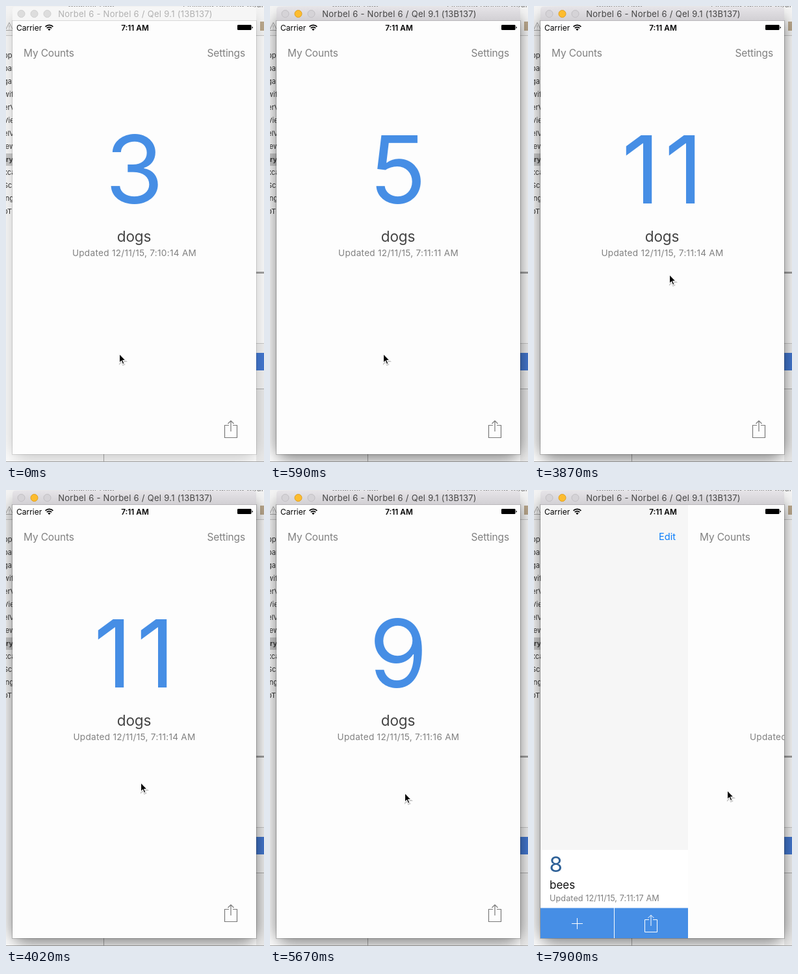
An HTML page for the animation above (8000 ms loop, 397 by 702 pixels).

```html
<!DOCTYPE html>
<html lang="en">
<head>
<meta charset="utf-8">
<title>Counter</title>
<style>
html, body { margin: 0; width: 100%; height: 100%; overflow: hidden; background: #f4f4f4; }
svg { display: block; width: 397px; height: 702px; font-family: Inter, Roboto, "Liberation Sans", sans-serif; }
text { white-space: pre; }
.nav { font-size: 15.5px; letter-spacing: -.15px; fill: #808080; }
.mid { text-anchor: middle; }
.end { text-anchor: end; }
.count { font-size: 145px; letter-spacing: 7px; fill: #468ee5; }
.unit { font-size: 22.6px; letter-spacing: -.15px; fill: #444; }
.stamp { font-size: 13.6px; letter-spacing: .28px; fill: #808080; }
.side { font-size: 11px; fill: #333; }
</style>
</head>
<body>
<svg viewBox="0 0 397 702">
  <defs>
    <linearGradient id="bar" x2="0" y2="1">
      <stop stop-color="#e6e4e8"/><stop offset="1" stop-color="#d1cfd3"/>
    </linearGradient>
    <filter id="soft" x="-20%" y="-10%" width="140%" height="120%"><feGaussianBlur stdDeviation="11"/></filter>
    <clipPath id="screen"><rect x="10" y="22" width="375" height="668"/></clipPath>
    <g id="share" fill="none">
      <path d="M343 645.5H336.5V664.5H355.5V645.5H349M346 655V638.5M341.5 643L346 638.5L350.5 643"/>
    </g>
    <path id="arrow" d="M0.5 0.5V14.3L3.5 11.4L5.6 16.4L7.9 15.4L5.8 10.5H10.2Z"/>
  </defs>

  <!-- desktop behind the window -->
  <rect width="397" height="702" fill="#fafafa"/>
  <rect width="397" height="45" fill="#f3f3f3"/>
  <rect x="385" y="520" width="12" height="69" fill="#f0f0f0"/>
  <path d="M0 45.5H397M385 519.5H397" stroke="#c9c9c9"/>
  <path d="M-1 37.5L5 25.5L11 37.5ZM5 29.5V33.5M5 35V36" fill="none" stroke="#a5a5a5"/>
  <rect x="391" y="24" width="6" height="14" fill="#b9a78c"/>
  <rect y="227" width="10" height="19" fill="#cbcbcb"/>
  <g id="files"></g>
  <rect x="385" y="589" width="12" height="113" fill="#e8e8e8"/>
  <path d="M385 589.5H397M150.5 690V702M0 701.5H397" stroke="#aaa"/>
  <rect x="385" y="409" width="12" height="3" fill="#a0a0a0"/>
  <rect x="385" y="534" width="12" height="27" fill="#4377cf"/>
  <g font-size="12" fill="#777">
    <text x="95" y="2">Counter App</text>
    <text x="272" y="2">Finished running Counter</text>
  </g>
  <rect id="shadow" x="8" y="14" width="379" height="684" rx="24" filter="url(#soft)"/>
  <path id="edge" d="M9.5 22V690.5H385.5V22" fill="none" stroke="#000"/>

  <!-- window -->
  <path id="titlebar" d="M10 23V6Q10 1 15 1H380Q385 1 385 6V23Z"/>
  <path id="barline" d="M10 22.5H385"/>
  <g id="lights"></g>
  <text id="title" class="mid" x="199" y="17" font-size="13" letter-spacing=".28">Norbel 6 - Norbel 6 / Qel 9.1 (13B137)</text>

  <g clip-path="url(#screen)">
    <rect x="10" y="23" width="375" height="667" fill="#fdfdfd"/>
    <g id="menu">
      <rect x="10" y="23" width="228" height="531" fill="#f6f6f6"/>
      <rect x="10" y="554" width="228" height="90" fill="#fff"/>
      <text class="end" x="218" y="76.5" font-size="14.6" fill="#087cfb">Edit</text>
      <text x="23.5" y="588" font-size="33" fill="#2d6097">8</text>
      <text x="24" y="614" font-size="17" fill="#111">bees</text>
      <text x="24" y="633" font-size="12.7" letter-spacing=".05" fill="#808080">Updated 12/11/15, 7:11:17 AM</text>
      <path d="M10 643.5H123V690H10ZM124 643.5H238V690H124Z" fill="#468ee5"/>
      <path d="M58 667.5H75M66.5 659V676" stroke="#fff"/>
      <use href="#share" x="-166" y="16" stroke="#fff"/>
    </g>
    <g id="main">
      <rect id="page" x="9" y="23" width="376" height="667"/>
      <text class="nav" x="27" y="77.5">My Counts</text>
      <text class="nav end" x="368" y="77.5">Settings</text>
      <text id="count" class="count mid" x="201" y="304"></text>
      <text class="unit mid" x="197" y="363">dogs</text>
      <text id="stamp" class="stamp mid" x="197.5" y="384.5"></text>
      <use href="#share" stroke="#000" stroke-opacity=".52" stroke-width="1.2"/>
    </g>
    <rect id="strip" x="10" y="23" width="375" height="5" fill="#fdfdfd"/>
    <text x="16" y="37.5" font-size="12">Carrier</text>
    <text class="mid" x="198.5" y="37.5" font-size="11.8" font-weight="600">7:11 AM</text>
    <g fill="none" stroke="#000" stroke-width="1.7">
      <path d="M60.6 31.8A8.3 8.3 0 0 1 72.4 31.8M62.8 34.1A5.2 5.2 0 0 1 70.2 34.1"/>
    </g>
    <path d="M66.5 38L64.4 35.9A3 3 0 0 1 68.6 35.9Z"/>
    <rect x="356" y="29" width="21.5" height="8" rx="1.2"/>
    <path d="M378.5 31.5Q380 32 380 33.1T378.5 34.7Z"/>
  </g>

  <g id="cursor">
    <use href="#arrow" x=".4" y="1.4" stroke="#000" stroke-width="2" opacity=".2"/>
    <use href="#arrow" stroke="#fff" stroke-width="1.1"/>
  </g>
</svg>

<script>
const LOOP = 8000;
const $ = id => document.getElementById(id);

// time, count, clock
const counts = [
  [0, 3, "10:14"], [290, 4, "11:11"], [440, 5, "11:11"], [740, 6, "11:12"],
  [1940, 7, "11:13"], [2390, 8, "11:13"], [2990, 9, "11:14"], [3280, 10, "11:14"],
  [3430, 11, "11:14"], [4170, 10, "11:15"], [5070, 9, "11:16"], [5810, 8, "11:17"]
];

// time, x, y of the pointer tip
const moves = [
  [0, 174, 535], [740, 177, 528], [890, 178, 521], [3580, 192, 476],
  [3730, 204, 435], [3870, 208, 413], [4020, 207, 450], [4170, 199, 512],
  [4320, 203, 540], [4470, 214, 545], [4620, 240, 485], [4770, 262, 430],
  [4920, 265, 445], [5070, 262, 520], [5220, 238, 500], [5370, 212, 464],
  [5670, 207, 466], [5810, 209, 510], [5960, 207, 538], [6710, 200, 534],
  [6860, 188, 523], [7010, 173, 512], [7160, 157, 505], [7310, 148, 502],
  [7610, 190, 490], [7750, 247, 473], [7900, 297, 462]
];

const slides = [[0, 0], [7610, 50], [7750, 150], [7900, 228]];
const flashes = [[440, 590], [3280, 3430]];

const at = (keys, t) => keys.filter(k => k[0] <= t).pop();

$("files").innerHTML = ["pp", "par", "ga", "wift", "erV", "Vie", "elV", "iew", "ry", "xca", "Scr", "ing", "pT"]
  .map((s, i) => `<text class="side" x="${i === 8 ? 0 : -4}" y="${80 + i * 20}"${i === 8 ? ' font-weight="600"' : ""}>${s}</text>`)
  .join("");
$("lights").innerHTML = [23.5, 43.5, 63.5]
  .map(x => `<circle cx="${x}" cy="12" r="5.5"/>`).join("");
const lights = [...$("lights").children];

function set(id, attrs) {
  for (const name in attrs) $(id).setAttribute(name, attrs[name]);
}

function drawWindow(active) {
  set("titlebar", { fill: active ? "url(#bar)" : "#f6f6f6" });
  set("barline", { stroke: active ? "#b9b7bb" : "#d8d8d8" });
  set("title", { fill: active ? "#444" : "#b0b0b0" });
  set("shadow", { opacity: active ? 0.45 : 0.18 });
  set("edge", { "stroke-opacity": active ? 0.2 : 0.12 });
  lights.forEach((dot, i) => {
    const lit = active && i === 1;
    dot.setAttribute("fill", lit ? "#fdbc2e" : active ? "#d5d3d7" : "#dddddd");
    dot.setAttribute("stroke", lit ? "#dfa023" : active ? "#c1bfc3" : "#d0d0d0");
  });
}

function draw(t) {
  const [, n, clock] = at(counts, t);
  const [, x, y] = at(moves, t);
  const [, shift] = at(slides, t);
  const flash = flashes.some(([a, b]) => t >= a && t < b);
  drawWindow(t >= 290);
  $("count").textContent = n;
  $("stamp").textContent = `Updated 12/11/15, 7:${clock} AM`;
  set("page", { fill: flash ? "#0000ff" : "#fdfdfd" });
  set("strip", { visibility: flash ? "visible" : "hidden" });
  set("menu", { visibility: shift ? "visible" : "hidden" });
  set("main", { transform: `translate(${shift} 0)` });
  set("cursor", { transform: `translate(${x} ${y})` });
}

const start = performance.now();
function tick() {
  draw((performance.now() - start) % LOOP);
  requestAnimationFrame(tick);
}
tick();
</script>
</body>
</html>
```
